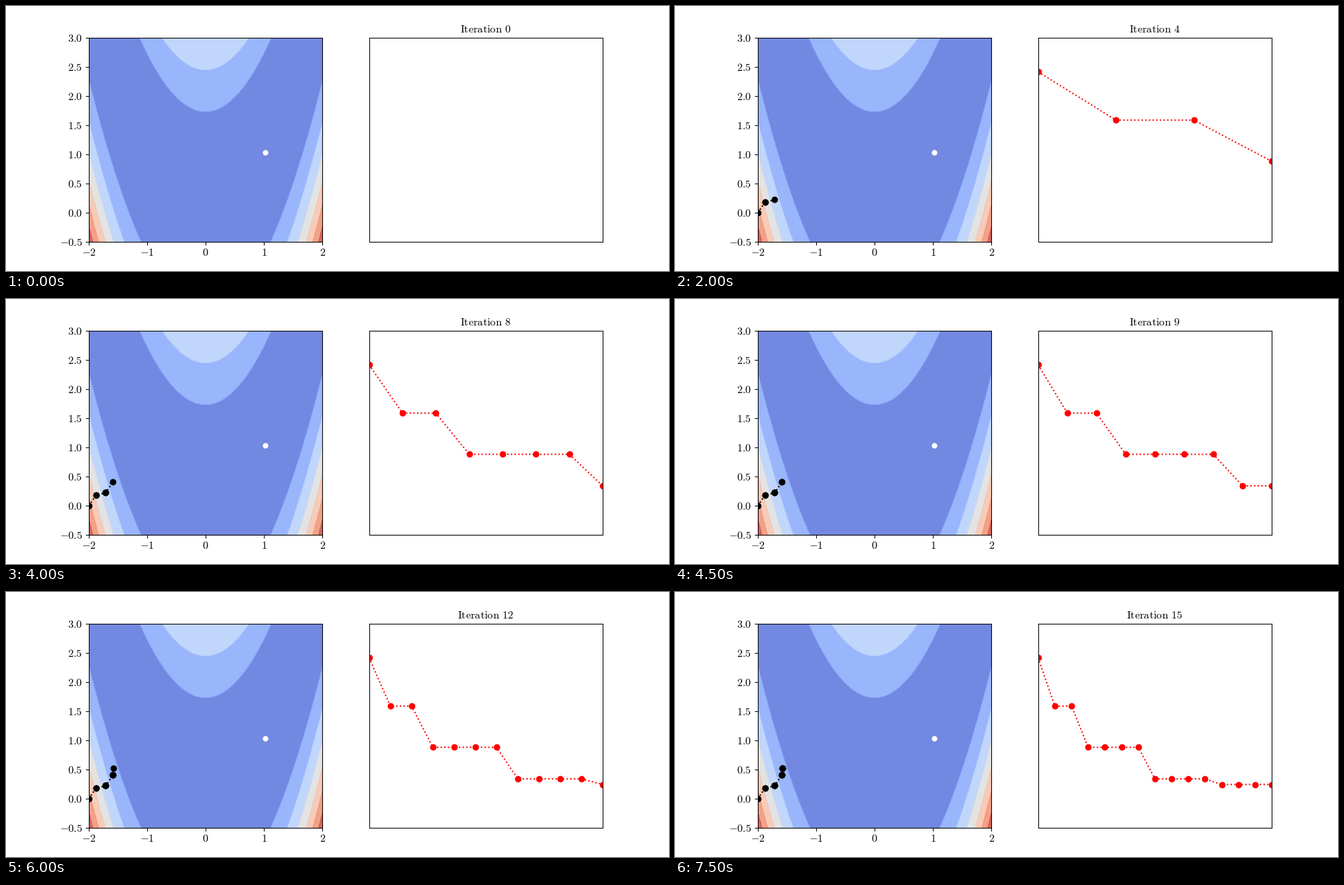
Animation, 1000 px wide and 400 px high, one loop 8000 ms. Source, as a matplotlib script:

```python
import numpy as np
import matplotlib.pyplot as plt
from matplotlib.animation import FuncAnimation

plt.rcParams["mathtext.fontset"] = "cm"
FONT = 11.75
STEPS = 16

# Accepted positions and their losses; rejected steps repeat the last one.
points = np.array([(-2, 0), (-1.88, 0.177), (-1.712, 0.223),
                   (-1.588, 0.405), (-1.576, 0.518)])
losses = np.array([1606, 1150, 761, 463, 410])
accepted = np.repeat(np.arange(5), [1, 2, 4, 4, 4])
path, history = points[accepted], losses[accepted]


def rosenbrock(x, y):
    return (1 - x) ** 2 + 100 * (y - x ** 2) ** 2


def label(ax, text, xy, offset, ha):
    ax.annotate(f"${text}$", xy, xytext=offset, textcoords="offset points",
                ha=ha, va="baseline", fontsize=FONT)


fig, (left, right) = plt.subplots(1, 2, figsize=(10, 4), dpi=100)

x, y = np.meshgrid(np.linspace(-2, 2, 200), np.linspace(-0.5, 3, 200))
left.contourf(x, y, rosenbrock(x, y), levels=np.arange(0, 2101, 300),
              cmap="coolwarm", alpha=0.8)
left.plot(1.025, 1.031, "wo", ms=5)
trail, = left.plot([], [], "ko:")

xticks, yticks = np.arange(-2, 3), np.arange(-0.5, 3.1, 0.5)
left.set(xlim=(-2, 2), ylim=(-0.5, 3))
left.set_xticks(xticks, [""] * len(xticks))
left.set_yticks(yticks, [""] * len(yticks))
for t in xticks:
    label(left, f"{t}", (t, -0.5), (0, -15.3), "center")
for t in yticks:
    label(left, f"{t:.1f}", (-2, t), (-7, -4.2), "right")

right.set(xticks=[], yticks=[], ylim=(0, 1928))
curve, = right.plot([], [], "ro:")
title = right.set_title("", fontsize=FONT)


def draw(n):
    trail.set_data(path[:n, 0], path[:n, 1])
    curve.set_data(np.arange(n), history[:n])
    right.set_xlim((0, n - 1) if n > 1 else (-0.05, 0.05))
    title.set_text(rf"$\mathrm{{Iteration}}\hspace{{0.38}}\mathrm{{{n}}}$")
    return trail, curve, title


anim = FuncAnimation(fig, draw, frames=STEPS, interval=500,
                     repeat=True, repeat_delay=0)
plt.show()
```
